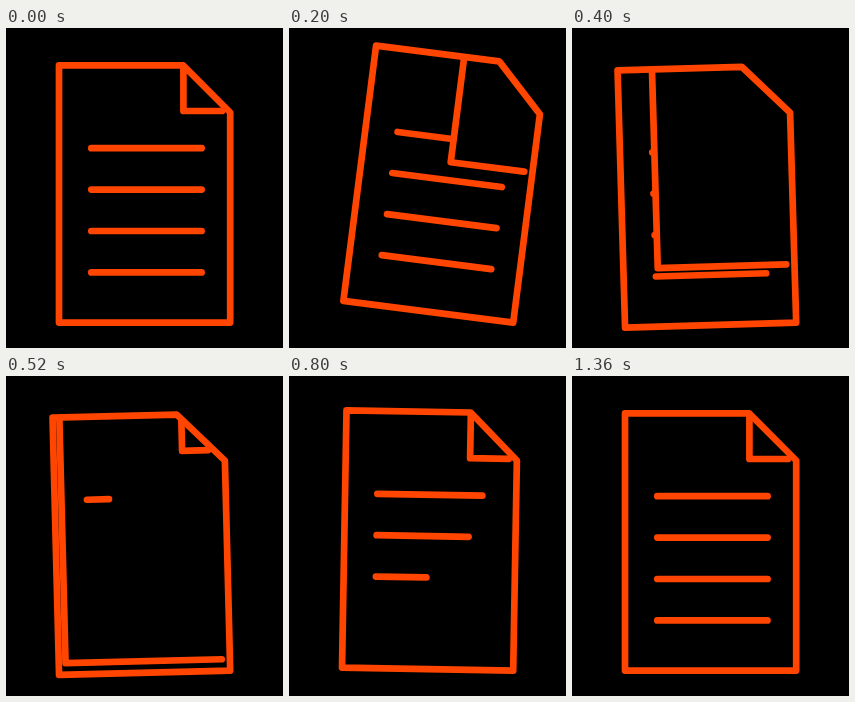
Write an HTML page with a canvas that moves like this. It is 277 px wide and 320 px high and loops after 3.96 s.

```html
<!DOCTYPE html>
<html lang="en">
<head>
<meta charset="utf-8">
<title>Page turn</title>
<style>
  html, body { margin: 0; height: 100%; overflow: hidden; background: #000; }
  canvas { display: block; }
</style>
</head>
<body>
<canvas id="stage" width="277" height="320"></canvas>
<script>
const ctx = document.getElementById('stage').getContext('2d');
const LOOP = 3960, STEP = 40;
const LEFT = 53, RIGHT = 224.2, TOP = 37.3, BOTTOM = 294.6;
const FOLD = { x: 177.4, y: 83 };
const FOLD_END = 216;
const LINE_START = 85.3, LINE_LENGTH = 110.3, LINE_Y = 120.2, LINE_GAP = 41.4;

// Wobble: [time in ms, angle in degrees]
const SWING = [[0, 0], [200, 7.3], [440, -2.9], [680, 2], [920, 0]];

const progress = (t, a, b) => Math.min(1, Math.max(0, (t - a) / (b - a)));
const mix = (a, b, p) => a + (b - a) * p;
const easeOut = (p, power) => 1 - (1 - p) ** power;
const softEase = p => mix(p, p * p * (3 - 2 * p), 0.5);

function angleAt(t) {
  for (let i = 1; i < SWING.length; i++) {
    const [t0, a] = SWING[i - 1], [t1, b] = SWING[i];
    if (t <= t1) {
      const p = progress(t, t0, t1);
      return mix(a, b, i === 1 ? easeOut(p, 2) : softEase(p));
    }
  }
  return 0;
}

function path(points, closed) {
  ctx.beginPath();
  points.forEach(([x, y]) => ctx.lineTo(x, y));
  if (closed) ctx.closePath();
  ctx.stroke();
}

function textLines(lengthOf) {
  for (let i = 0; i < 4; i++) {
    const length = lengthOf(i) * LINE_LENGTH, y = LINE_Y + i * LINE_GAP;
    if (length > 0) path([[LINE_START, y], [LINE_START + length, y]]);
  }
}

const fold = (x, y) => path([[x, 39.5], [x, y], [FOLD_END, y]]);

// The old sheet is peeled off by its folded corner
function oldSheet(t) {
  const p = easeOut(progress(t, 80, 560), 1.17);
  const x = mix(FOLD.x, LEFT, p), y = mix(FOLD.y, BOTTOM, p);
  textLines(() => 1);
  ctx.fillRect(x, TOP, RIGHT - x, y - TOP);
  fold(x, y);
}

function newSheet(t) {
  const size = easeOut(progress(t, 460, 600), 2);
  if (size > 0) {
    const grow = ([x, y]) => [mix(190.5, x, size), mix(54.5, y, size)];
    path([[FOLD.x, 39.5], [FOLD.x, FOLD.y], [FOLD_END, FOLD.y]].map(grow));
  }
  textLines(i => {
    const age = t - 497 - i * 120;
    return age > 0 ? Math.min(1, 1.007 * (1 - Math.exp(-age / 104))) : 0;
  });
}

function draw(t) {
  ctx.setTransform(1, 0, 0, 1, 0, 0);
  ctx.fillStyle = '#000';
  ctx.fillRect(0, 0, 277, 320);
  ctx.strokeStyle = '#ff4500';
  ctx.lineWidth = 6.7;
  ctx.lineCap = ctx.lineJoin = 'round';

  ctx.translate(RIGHT, BOTTOM);
  ctx.rotate(angleAt(t) * Math.PI / 180);
  ctx.translate(-RIGHT, -BOTTOM);

  if (t < 560) oldSheet(t);
  newSheet(t);
  path([[LEFT, TOP], [177.2, TOP], [RIGHT, 84.5], [RIGHT, BOTTOM], [LEFT, BOTTOM]], true);
}

const start = performance.now();
function tick() {
  const t = (performance.now() - start) % LOOP;
  draw(Math.floor(t / STEP) * STEP);
  requestAnimationFrame(tick);
}
tick();
</script>
</body>
</html>
```
